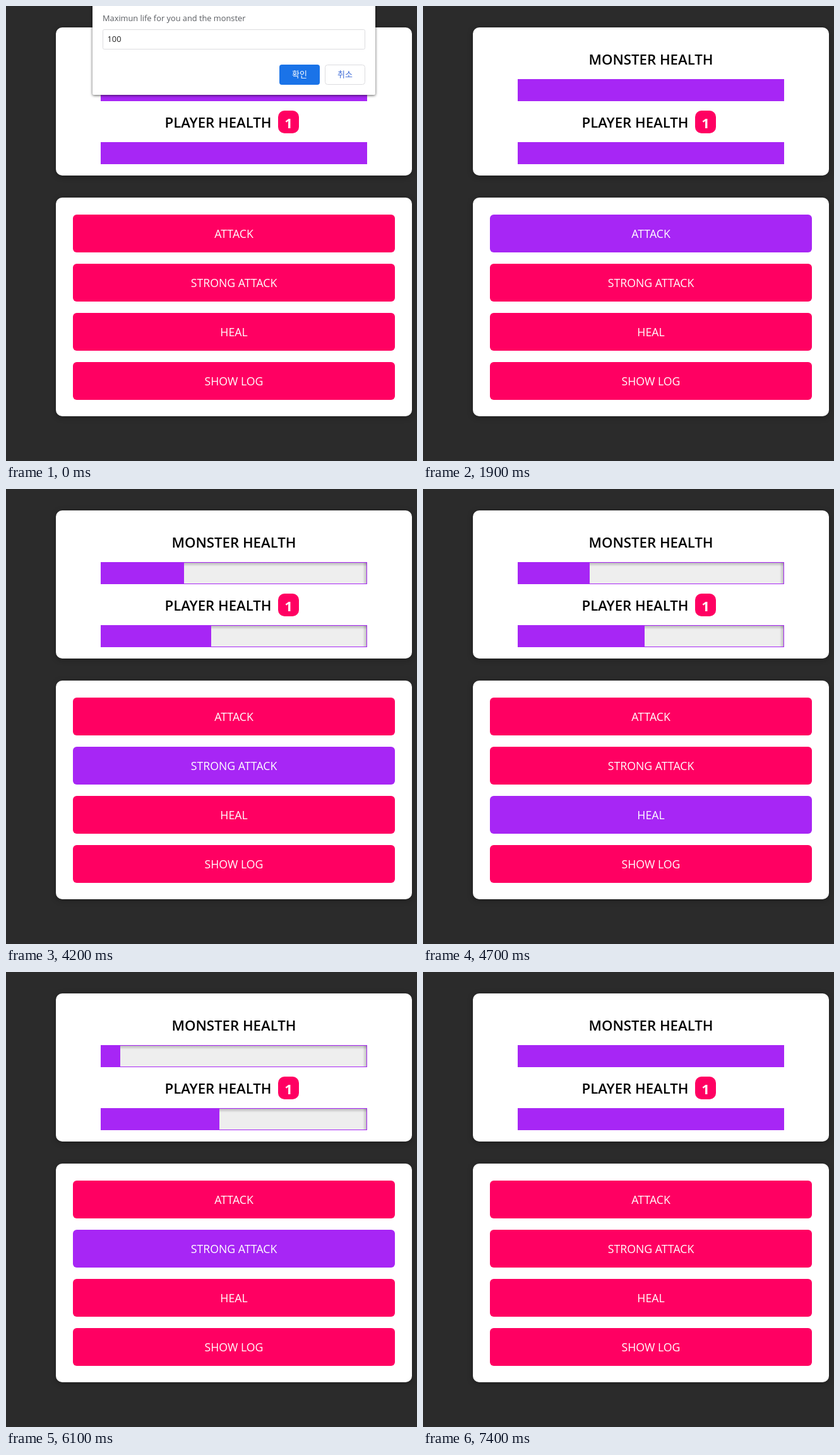
An HTML page that plays this animation: 651x722 px, repeating every 8.4 s.

```html
<!DOCTYPE html>
<html lang="en">
<head>
<meta charset="utf-8">
<title>Monster game</title>
<style>
  html, body { margin: 0; width: 100%; height: 100%; overflow: hidden; background: #2b2b2b; }
  svg { display: block; font-family: "Open Sans", "Noto Sans", sans-serif; }
  .card { fill: #fff; filter: drop-shadow(0 2px 4px rgba(0, 0, 0, .3)); }
  .title { font-size: 22.2px; font-weight: 600; text-anchor: middle; }
  .badge { fill: #fff; font-weight: 700; }
  .action rect { fill: #ff0062; }
  .action.hover rect { fill: #a726f5; }
  .action text { fill: #fff; font-size: 17.7px; text-anchor: middle; }
  .fill { fill: #a726f5; }
  .frame { fill: none; stroke: #a726f5; }
  .dialog { font-size: 12.8px; fill: #5a5d62; }
  .panel { fill: #fff; filter: drop-shadow(0 1px 2px rgba(0, 0, 0, .65)); }
  .outline { fill: #fff; stroke: #dcdcdf; }
  .ok { fill: #1a73e8; }
  .ok.lit { fill: #4990ec; }
  .ko { font: 13px "Noto Sans CJK KR", "Noto Sans CJK JP", sans-serif; text-anchor: middle; }
</style>
</head>
<body>
<svg width="651" height="722" viewBox="0 0 651 722">
  <defs>
    <linearGradient id="top" x2="0" y2="1">
      <stop stop-color="#000" stop-opacity=".26"/>
      <stop offset="1" stop-color="#000" stop-opacity="0"/>
    </linearGradient>
    <linearGradient id="side" x1="1" x2="0">
      <stop stop-color="#000" stop-opacity=".24"/>
      <stop offset="1" stop-color="#000" stop-opacity="0"/>
    </linearGradient>
    <g id="track">
      <rect width="422" height="35" fill="#eee"/>
      <rect width="422" height="7" fill="url(#top)"/>
      <rect x="415" width="7" height="35" fill="url(#side)"/>
    </g>
  </defs>

  <rect class="card" x="79" y="34" width="564" height="235" rx="10"/>
  <text class="title" x="361" y="93">MONSTER HEALTH</text>
  <use href="#track" x="150" y="116"/>
  <rect class="fill" id="monster" x="150" y="116" width="422" height="35"/>
  <rect class="frame" x="150.5" y="116.5" width="421" height="34"/>

  <text class="title" x="336" y="193">PLAYER HEALTH</text>
  <rect x="431" y="166" width="33" height="36" rx="10" fill="#ff0062"/>
  <text class="title badge" x="447.5" y="194">1</text>
  <use href="#track" x="150" y="216"/>
  <rect class="fill" id="player" x="150" y="216" width="422" height="35"/>
  <rect class="frame" x="150.5" y="216.5" width="421" height="34"/>

  <rect class="card" x="79" y="304" width="564" height="347" rx="10"/>
  <g class="action" transform="translate(106 331)"><rect width="510" height="60" rx="6"/><text x="255" y="37">ATTACK</text></g>
  <g class="action" transform="translate(106 409)"><rect width="510" height="60" rx="6"/><text x="255" y="37">STRONG ATTACK</text></g>
  <g class="action" transform="translate(106 487)"><rect width="510" height="60" rx="6"/><text x="255" y="37">HEAL</text></g>
  <g class="action" transform="translate(106 565)"><rect width="510" height="60" rx="6"/><text x="255" y="37">SHOW LOG</text></g>

  <g class="dialog" id="prompt">
    <rect class="panel" x="137" y="-10" width="448" height="151" rx="2"/>
    <text x="153" y="24">Maximun life for you and the monster</text>
    <rect class="outline" x="153.5" y="37.5" width="415" height="31" rx="2"/>
    <text x="160.5" y="57" fill="#222">100</text>
    <rect class="ok" x="433" y="93" width="64" height="32" rx="4"/>
    <text class="ko" lang="ko" x="465" y="113" fill="#fff">확인</text>
    <rect class="outline" x="505.5" y="93.5" width="63" height="31" rx="4"/>
    <text class="ko" lang="ko" x="537" y="113" fill="#3d6ad6">취소</text>
  </g>

  <g class="dialog" id="alert" visibility="hidden">
    <rect class="panel" x="137" y="-10" width="448" height="103" rx="2"/>
    <text x="153" y="24">You won!</text>
    <rect x="504" y="44" width="66" height="34" rx="4" fill="#a9c9f6"/>
    <rect class="ok" id="confirm" x="505" y="45" width="64" height="32" rx="3"/>
    <circle id="ripple" cx="546" cy="57" r="13.5" fill="#fff" fill-opacity=".1"/>
    <text class="ko" lang="ko" x="537" y="65" fill="#fff">확인</text>
  </g>
</svg>
<script>
  const LOOP = 8400, STEP = 100, SLIDE = 200, LEFT = 150, FULL = 572;
  const $ = id => document.getElementById(id);
  const actions = document.querySelectorAll('.action');

  // time, right edge of the monster bar, right edge of the player bar
  const hits = [
    [2305, 540, 530], [2640, 505, 502], [2840, 470, 477], [3040, 446, 453],
    [3540, 402, 418], [3740, 350, 372], [3940, 297, 334], [4140, 264, 314],
    [4640, 264, 395],
    [5540, 228, 372], [5840, 194, 346], [6040, 165, 329],
    [7200, FULL, FULL]
  ];
  // time, index of the hovered button
  const hovers = [[0, -1], [1900, 0], [3300, 1], [4400, 2], [5200, 1], [7300, -1]];

  const easeOut = p => 1 - (1 - p) ** 1.7;
  const show = (id, on) => $(id).setAttribute('visibility', on ? 'visible' : 'hidden');

  function edge(t, column) {
    return hits.reduce((x, hit) => {
      const p = Math.min(1, Math.max(0, (t - hit[0]) / SLIDE));
      return x + (hit[column] - x) * easeOut(p);
    }, FULL);
  }

  function draw(t) {
    $('monster').setAttribute('width', Math.round(edge(t, 1)) - LEFT);
    $('player').setAttribute('width', Math.round(edge(t, 2)) - LEFT);
    const hovered = hovers.filter(h => h[0] <= t).pop()[1];
    actions.forEach((a, i) => a.classList.toggle('hover', i === hovered));
    const won = t >= 6300 && t < 7300;
    show('prompt', t < 1200);
    show('alert', won);
    show('ripple', won && t >= 7200);
    $('confirm').classList.toggle('lit', t >= 6900);
  }

  const start = performance.now();
  function tick() {
    const t = (performance.now() - start) % LOOP;
    draw(Math.floor(t / STEP) * STEP);
    requestAnimationFrame(tick);
  }
  tick();
</script>
</body>
</html>
```
